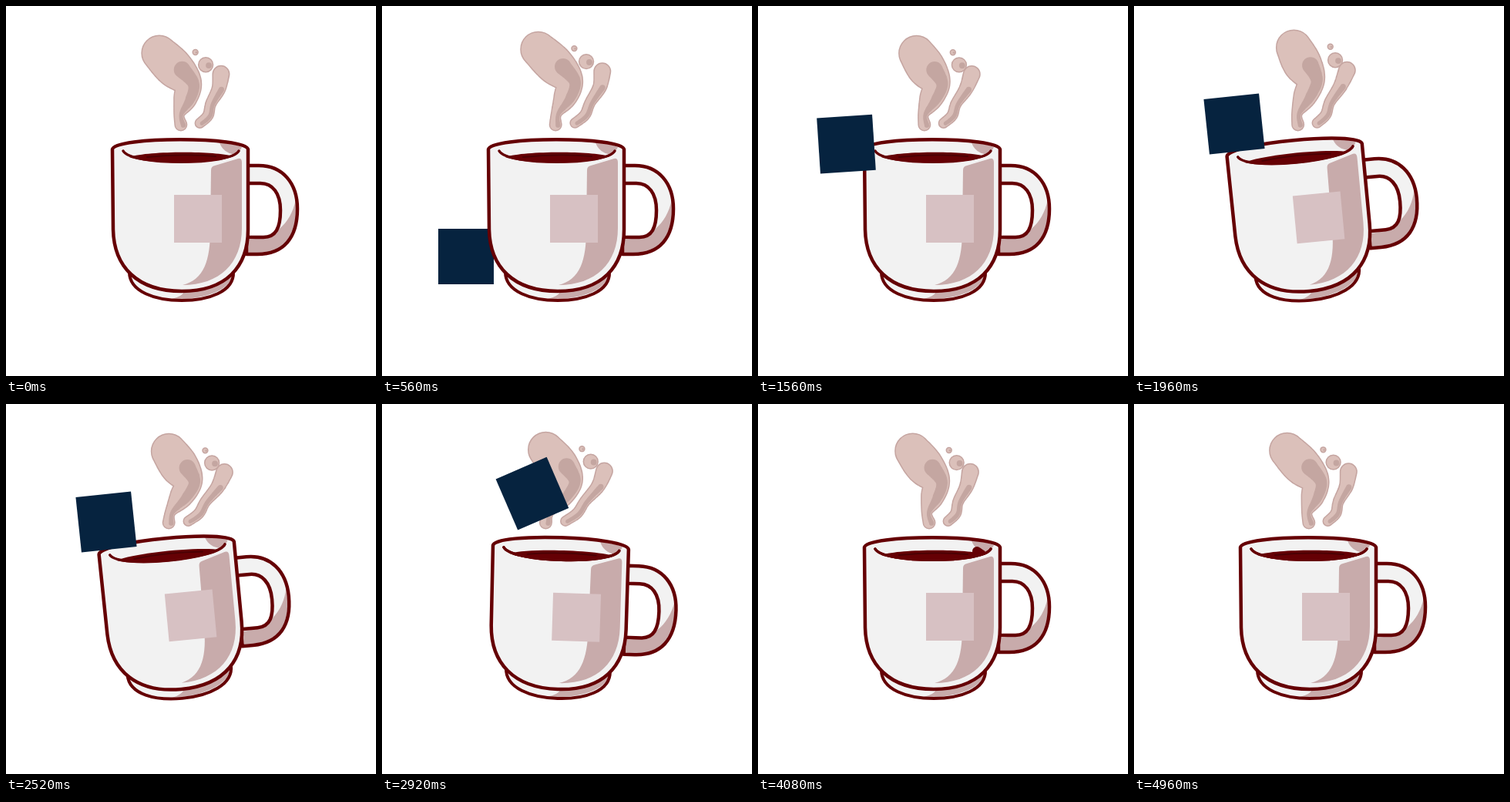
An HTML page with a canvas that plays this animation: 480 by 480 pixels, repeating every 5000 ms.

```html
<!DOCTYPE html>
<html>
<head>
<meta charset="utf-8">
<title>Coffee mug</title>
<style>
html, body { margin: 0; width: 100%; height: 100%; overflow: hidden; background: #fff; }
canvas { display: block; }
</style>
</head>
<body>
<canvas id="stage" width="480" height="480"></canvas>
<script>
const ctx = document.getElementById('stage').getContext('2d');
const LOOP = 5000, TAU = Math.PI * 2;
const DARK = '#650004', WHITE = '#f2f2f2', SHADE = '#c8abab', PRINT = '#d7c1c3', NAVY = '#06233f';
const STEAM = '#dbc0ba', STEAM_SHADE = '#c4a6a1', STEAM_EDGE = '#c5a5a1';

const span = (t, a, b) => Math.max(0, Math.min(1, (t - a) / (b - a)));
const rise = (t, a, b) => { const p = span(t, a, b); return p * p * (3 - 2 * p); };
const pulse = (t, a, b, c, d) => rise(t, a, b) - rise(t, c, d);
const mix = (a, b, p) => a + (b - a) * p;
const shape = d => new Path2D(d);

function paint(path, fill, stroke, width) {
  if (stroke) { ctx.strokeStyle = stroke; ctx.lineWidth = width; }
  if (fill) { ctx.fillStyle = fill; ctx.fill(path); }
  if (stroke) ctx.stroke(path);
}

function isolated(work) {
  ctx.save();
  work();
  ctx.restore();
}

// Steam: round brushes [x, y, radius] swept along a curve
const plume = [[205, 62, 22], [221, 81, 24], [236, 100, 17], [230, 120, 14], [219, 140, 6], [219, 154, 7]];
const wisp = [[281, 89, 10], [275, 108, 8], [262, 127, 6], [256, 142, 6], [244, 152, 5.5]];
const smallDrop = [[252, 61, 2.7]], largeDrop = [[263, 77, 8.7]];
const lit = pts => pts.map(([x, y, r]) => [x + r * 0.45, y + r * 0.1, r * 0.45]);

// Head and tail swing against each other, the middle ripples, the top bobs
function drift([x, y, r], t) {
  const a = TAU * t / LOOP, v = (y - 50) / 105;
  const sway = -8 * Math.cos(a) * (1 - 2 * v) + 7 * Math.sin(2 * a) * Math.sin(Math.PI * Math.max(0, v));
  const bob = -4.5 - 5 * Math.cos(4 * a - TAU * 0.63);
  return [x + sway, y + bob * (1 - v), r];
}

function sweep(pts) {
  const path = new Path2D(), last = pts.length - 1;
  const at = i => pts[Math.max(0, Math.min(last, i))];
  for (let s = 0; s <= last; s += 0.05) {
    const i = Math.floor(s), u = s - i;
    const [x, y, r] = [0, 1, 2].map(k => {
      const [p, a, b, q] = [at(i - 1)[k], at(i)[k], at(i + 1)[k], at(i + 2)[k]];
      return a + u * ((b - p) + u * ((2 * p - 5 * a + 4 * b - q) + u * (3 * (a - b) + q - p))) / 2;
    });
    path.moveTo(x + r, y);
    path.arc(x, y, r, 0, TAU);
  }
  return path;
}

function drawSteam(t) {
  for (const part of [plume, wisp, smallDrop, largeDrop]) {
    const pts = part.map(p => drift(p, t)), body = sweep(pts);
    paint(body, null, STEAM_EDGE, 3);
    paint(body, STEAM);
    paint(sweep(lit(pts.length > 1 ? pts.slice(1) : pts)), STEAM_SHADE);
  }
}

// Mug
const mug = {
  handle: shape('M313 207H328C359 207 378 230 378 263C378 301 360 322 326 322H312V300H334C350 300 356 288 356 265C356 243 346 230 330 230H313Z'),
  handleShade: shape('M376 251C369 284 347 302 314 303V320H326C357 320 376 301 376 263Z'),
  base: shape('M160 345C160 371 194 382 228 382C262 382 296 371 295 345Z'),
  baseShade: shape('M215 380Q228 377 231 371C260 370 284 361 293 349C292 370 252 382 215 380Z'),
  body: shape('M138 186C140 169 312 169 314 186L314 290C314 338 286 370 228 370C170 370 140 338 139 290Z'),
  bodyShade: shape('M229 362C257 355 265 330 265 290L266 213Q266 208 271 207L301 198Q306 197 306 203V288C306 334 277 362 229 362Z'),
  rimShade: shape('M277 177Q281 190 297 193Q304 188 306 183Q297 179 277 177Z'),
  coffee: shape('M160 196C185 188 270 188 295 195C270 206 185 206 160 196Z'),
  ripple: shape('M183 196Q228 191 272 195'),
  rim: shape('M152 188C162 207 292 207 302 188'),
  opening: shape('M0 0H480V188H302C292 207 162 207 152 188H0Z')
};

function drawMug() {
  paint(mug.handle, WHITE);
  paint(mug.handleShade, SHADE);
  paint(mug.handle, null, DARK, 4.5);
  paint(mug.base, WHITE);
  paint(mug.baseShade, SHADE);
  paint(mug.base, null, DARK, 4);
  paint(mug.body, WHITE);
  paint(mug.bodyShade, SHADE);
  paint(mug.rimShade, SHADE);
  paint(mug.body, null, DARK, 4.5);
  paint(mug.coffee, DARK);
  paint(mug.ripple, null, '#4a0003', 2);
  paint(mug.rim, null, DARK, 3.5);
  ctx.fillStyle = PRINT;
  ctx.fillRect(218, 245, 62, 62);
}

// Leans under the square, swings back as it leaves, is knocked as it lands
function tilt(t) {
  const degrees = -5.4 * pulse(t, 1660, 1800, 2640, 2780)
    + 1.8 * pulse(t, 2640, 2800, 2960, 3340)
    + 3.6 * pulse(t, 2950, 3100, 3100, 3340);
  ctx.translate(227, 375);
  ctx.rotate(degrees * TAU / 360);
  ctx.translate(-227, -375);
}

const splash = {
  fin: shape('M162 208C158 178 151 141 155 129C160 120 168 127 170 141C174 161 177 185 178 208Z'),
  mass: shape('M174 208C175 172 176 143 185 126C190 121 199 126 207 123C216 120 219 108 225 109C233 110 231 121 236 128Q245 142 246 184Q247 143 253 128C258 115 267 119 272 121C280 122 282 115 288 118C293 123 289 133 292 140C302 154 303 172 302 208Z'),
  curl: shape('M178 99C181 90 198 88 206 97C214 105 206 116 215 122Q208 127 202 121C198 112 200 107 191 107C183 108 177 104 178 99Z'),
  gleams: shape('M181 169Q182 145 190 129Q202 132 214 126Q220 115 225 116Q227 127 234 134Q242 148 244 172M250 165Q252 139 262 124M184 98Q195 92 203 102M160 133Q166 152 170 186')
};

function drawSplash(t) {
  const height = pulse(t, 3060, 3340, 3540, 3920);
  if (height > 0) isolated(() => {
    ctx.translate(0, 196 * (1 - height));
    ctx.scale(1, height);
    for (const part of [splash.fin, splash.mass, splash.curl]) paint(part, DARK);
    paint(splash.gleams, null, '#ae7f7f', 1.8);
  });
  const bead = 6 * pulse(t, 3750, 3900, 4080, 4300);
  if (bead > 0) paint(sweep([[284, 191, bead], [292, 193, bead / 2]]), DARK);
}

// Square: slides out from behind the mug, hops onto the rim, dives in
function drawSquare(t) {
  const slide = rise(t, 250, 680), hop = span(t, 1340, 1690), dive = span(t, 2660, 3050);
  const arc = (p, height) => 4 * height * p * (1 - p);
  isolated(() => {
    ctx.translate(200 - 112 * slide + 42 * hop + 97 * dive,
      325 - 172 * hop + 117 * dive - arc(hop, 40) - arc(dive, 130));
    ctx.rotate((-6 * hop - 26 * dive) * TAU / 360);
    ctx.fillStyle = NAVY;
    ctx.fillRect(-36, -36, 72, 72);
  });
}

function draw(t) {
  const behind = t < 1340, diving = t > 2900, sunk = t > 3050;
  ctx.clearRect(0, 0, 480, 480);
  ctx.lineJoin = ctx.lineCap = 'round';
  drawSteam(t);
  if (behind) drawSquare(t);
  isolated(() => { tilt(t); drawMug(); });
  if (!behind && !diving) drawSquare(t);
  if (diving) isolated(() => {
    tilt(t);
    isolated(() => {
      ctx.clip(mug.opening);
      drawSplash(t);
      ctx.resetTransform();
      if (!sunk) drawSquare(t);
    });
    paint(mug.rim, null, DARK, 3.5);
  });
}

const start = performance.now();
function tick() {
  draw((performance.now() - start) % LOOP);
  requestAnimationFrame(tick);
}
tick();
</script>
</body>
</html>
```
